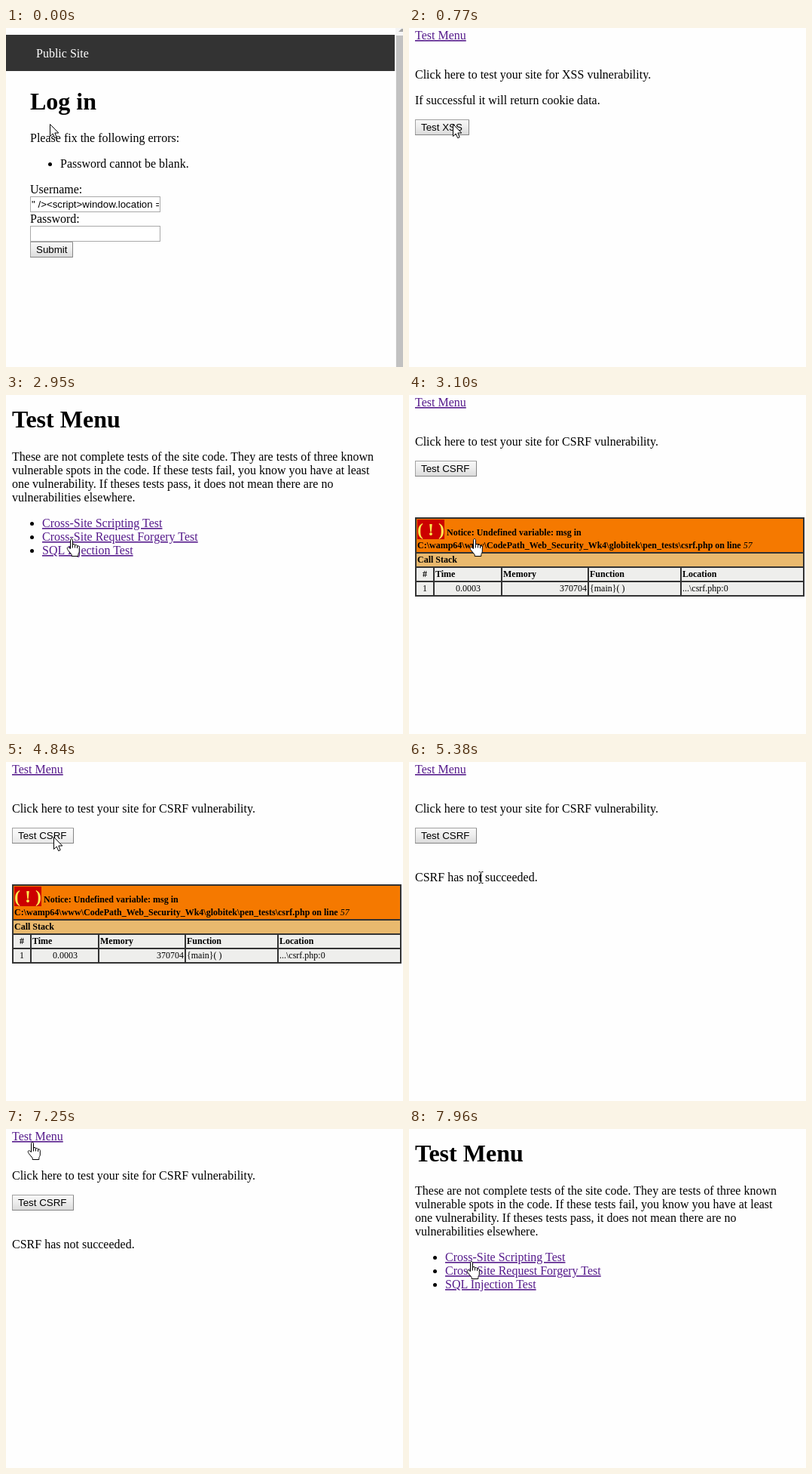
Write an HTML page that moves like this. It is 527 px wide and 449 px high and loops after 8000 ms.

```html
<!DOCTYPE html>
<html lang="en">
<head>
<meta charset="utf-8">
<title>Site security tests</title>
<style>
html, body { margin: 0; width: 100%; height: 100%; overflow: hidden; background: #fefefe; }
svg { display: block; }
text { font: 16px "Liberation Serif", "Times New Roman", serif; white-space: pre; }
.h1 { font-size: 32px; font-weight: bold; }
.ui { font: 13.333px "Liberation Sans", Arial, sans-serif; }
.link {
  fill: #551a8b;
  text-decoration: underline 1px;
  text-underline-offset: 2px;
  text-decoration-skip-ink: none;
}
.small text { font-size: 12px; }
.small .b { font-weight: bold; }
.small .line { font-style: italic; font-weight: normal; }
.small .bang { font-size: 24px; fill: #fce94f; }
.mid { text-anchor: middle; }
.end { text-anchor: end; }
.face { fill: url(#face); stroke: #a2a2a2; }
.edge { fill: none; stroke: #858585; }
.field { fill: #fff; stroke: #a9a9a9; }

/* Every change is a hard cut on one shared 8 s clock. */
.page, .shape, .state { opacity: 0; }
.page, .shape, .state, .link, #cursor, #selected rect { animation: 8s step-end infinite; }

#login { animation-name: login; }
#xss { animation-name: xss; }
#menu { animation-name: menu; }
#csrf { animation-name: csrf; }
#notice { animation-name: notice; }
#result { animation-name: result; }
@keyframes login { 0% { opacity: 1 } 9.625% { opacity: 0 } }
@keyframes xss { 9.625% { opacity: 1 } 26.75% { opacity: 0 } }
@keyframes menu { 26.75% { opacity: 1 } 38.75% { opacity: 0 } 97.75% { opacity: 1 } }
@keyframes csrf { 38.75% { opacity: 1 } 97.75% { opacity: 0 } }
@keyframes notice { 38.75% { opacity: 1 } 62.625% { opacity: 0 } }
@keyframes result { 62.625% { opacity: 1 } 97.75% { opacity: 0 } }

#xss .link { animation-name: press-xss; }
#to-csrf { animation-name: press-item; }
#csrf .link { animation-name: press-csrf; }
@keyframes press-xss { 23.75% { fill: #f00 } 25.25% { fill: #551a8b } }
@keyframes press-item { 35.25% { fill: #f00 } 36.875% { fill: #551a8b } }
@keyframes press-csrf { 94.25% { fill: #f00 } 96.125% { fill: #551a8b } }

#hover { fill: #fff; animation-name: hover; }
#down { fill: #d4d4d4; animation-name: down; }
@keyframes hover {
  49.25% { opacity: .35 } 62.625% { opacity: 0 }
  84.125% { opacity: .35 } 85.75% { opacity: 0 }
}
@keyframes down { 59% { opacity: .9 } 60.5% { opacity: 0 } }

#selected rect { animation-name: select; }
@keyframes select { 73.75% { width: 15px } 75.75% { width: 80px } 82.25% { width: 0 } }

#cursor { animation-name: move; }
@keyframes move {
  0% { transform: translate(58px, 127px) }
  13.125% { transform: translate(66px, 116px) }
  14.625% { transform: translate(68px, 107px) }
  16.25% { transform: translate(64px, 77px) }
  17.75% { transform: translate(56px, 56px) }
  19.25% { transform: translate(46px, 38px) }
  20.75% { transform: translate(40px, 22px) }
  22.25% { transform: translate(36px, 16px) }
  28.5% { transform: translate(60px, 62px) }
  30.125% { transform: translate(81px, 123px) }
  31.875% { transform: translate(81px, 150px) }
  33.375% { transform: translate(81px, 179px) }
  35.25% { transform: translate(80px, 190px) }
  44.375% { transform: translate(79px, 172px) }
  45.875% { transform: translate(76px, 140px) }
  47.375% { transform: translate(69px, 114px) }
  49.25% { transform: translate(64px, 100px) }
  51.125% { transform: translate(63px, 99px) }
  67.25% { transform: translate(92px, 145px) }
  69.125% { transform: translate(106px, 176px) }
  70.625% { transform: translate(116px, 168px) }
  72.25% { transform: translate(92px, 145px) }
  73.75% { transform: translate(107px, 148px) }
  75.75% { transform: translate(172px, 143px) }
  77.5% { transform: translate(173px, 150px) }
  80.625% { transform: translate(169px, 143px) }
  82.25% { transform: translate(160px, 143px) }
  84.125% { transform: translate(78px, 98px) }
  85.75% { transform: translate(44px, 48px) }
  87.25% { transform: translate(30px, 23px) }
  89% { transform: translate(28px, 18px) }
  90.625% { transform: translate(28px, 17px) }
  97.75% { transform: translate(56px, 52px) }
  99.5% { transform: translate(76px, 175px) }
}

#arrow { animation-name: arrow; }
#hand { animation-name: hand; }
#beam { animation-name: beam; }
@keyframes arrow {
  0% { opacity: 1 } 22.25% { opacity: 0 }
  28.5% { opacity: 1 } 30.125% { opacity: 0 }
  31.875% { opacity: 1 } 33.375% { opacity: 0 }
  45.875% { opacity: 1 } 67.25% { opacity: 0 }
  69.125% { opacity: 1 } 72.25% { opacity: 0 }
  77.5% { opacity: 1 } 80.625% { opacity: 0 }
  84.125% { opacity: 1 } 89% { opacity: 0 }
  97.75% { opacity: 1 } 99.5% { opacity: 0 }
}
@keyframes hand {
  22.25% { opacity: 1 } 28.5% { opacity: 0 }
  33.375% { opacity: 1 } 44.375% { opacity: 0 }
  89% { opacity: 1 } 97.75% { opacity: 0 }
  99.5% { opacity: 1 }
}
@keyframes beam {
  30.125% { opacity: 1 } 31.875% { opacity: 0 }
  44.375% { opacity: 1 } 45.875% { opacity: 0 }
  67.25% { opacity: 1 } 69.125% { opacity: 0 }
  72.25% { opacity: 1 } 77.5% { opacity: 0 }
  80.625% { opacity: 1 } 84.125% { opacity: 0 }
}
</style>
</head>
<body>
<svg width="527" height="449" viewBox="0 0 527 449">
  <defs>
    <linearGradient id="face" x2="0" y2="1">
      <stop offset="0" stop-color="#f8f8f8"/>
      <stop offset=".45" stop-color="#eee"/>
      <stop offset="1" stop-color="#dadada"/>
    </linearGradient>
    <clipPath id="selected"><rect x="92" y="144" width="0" height="17"/></clipPath>
    <clipPath id="inner"><rect x="34" y="225" width="169" height="17"/></clipPath>
  </defs>
  <rect width="527" height="449" fill="#fefefe"/>

  <g id="login" class="page">
    <path d="M0 9H516V57H0Z" fill="#333"/>
    <text x="40" y="39" fill="#fff">Public Site</text>
    <path d="M517 0h10v449h-10z" fill="#f5f5f5"/>
    <path d="M518 10h9v439h-9z" fill="#c1c1c1"/>
    <path d="M521 5h6v-4h-2z" fill="#a6a6a6"/>
    <text class="h1" x="32" y="108">Log in</text>
    <text x="32" y="151">Please fix the following errors:</text>
    <circle cx="58.5" cy="180.5" r="2.5"/>
    <text x="72" y="185">Password cannot be blank.</text>
    <text x="32" y="219">Username:</text>
    <rect class="field" x="32.5" y="223.5" width="172" height="20"/>
    <g clip-path="url(#inner)"><text class="ui" x="34" y="238">" /&gt;&lt;script&gt;window.location =</text></g>
    <text x="32" y="258">Password:</text>
    <rect class="field" x="32.5" y="262.5" width="172" height="20"/>
    <rect class="face" x="32.5" y="283.5" width="56" height="20"/>
    <path class="edge" d="M32 303.5H88.5V284"/>
    <text class="ui" x="40" y="298">Submit</text>
  </g>

  <g id="xss" class="page">
    <text class="link" x="8" y="15">Test Menu</text>
    <text x="8" y="67">Click here to test your site for XSS vulnerability.</text>
    <text x="8" y="101">If successful it will return cookie data.</text>
    <rect class="face" x="8.5" y="121.5" width="71" height="20"/>
    <path class="edge" d="M8 141.5H79.5V122"/>
    <text class="ui" x="16" y="136">Test XSS</text>
  </g>

  <g id="menu" class="page">
    <text class="h1" x="8" y="43">Test Menu</text>
    <text x="8" y="87">These are not complete tests of the site code. They are tests of three known</text>
    <text x="8" y="105">vulnerable spots in the code. If these tests fail, you know you have at least</text>
    <text x="8" y="123">one vulnerability. If theses tests pass, it does not mean there are no</text>
    <text x="8" y="141">vulnerabilities elsewhere.</text>
    <circle cx="34.5" cy="170.5" r="2.5"/>
    <circle cx="34.5" cy="188.5" r="2.5"/>
    <circle cx="34.5" cy="206.5" r="2.5"/>
    <text class="link" x="48" y="175">Cross-Site Scripting Test</text>
    <text class="link" id="to-csrf" x="48" y="193">Cross-Site Request Forgery Test</text>
    <text class="link" x="48" y="211">SQL Injection Test</text>
  </g>

  <g id="csrf" class="page">
    <text class="link" x="8" y="15">Test Menu</text>
    <text x="8" y="67">Click here to test your site for CSRF vulnerability.</text>
    <rect class="face" x="8.5" y="87.5" width="81" height="20"/>
    <rect class="state" id="hover" x="9" y="88" width="80" height="19"/>
    <rect class="state" id="down" x="9" y="88" width="80" height="19"/>
    <path class="edge" d="M8 107.5H89.5V88"/>
    <text class="ui" x="16" y="102">Test CSRF</text>
  </g>

  <g id="notice" class="page small">
    <path d="M8 162H525V209H8Z" fill="#f57900"/>
    <path d="M8 209H525V228H8Z" fill="#e9b96e"/>
    <path d="M8 228H525V267H8Z" fill="#eeeeec"/>
    <path d="M9 163H524V266H9ZM9 209H524M9 228H524M9 247H524M33 228V266M123 228V266M238 228V266M361 228V266" fill="none" stroke="#333" stroke-width="2"/>
    <path d="M11 165h36v26h-36z" fill="#c00"/>
    <text class="b bang" x="11" y="186">( ! )</text>
    <text class="b" x="50" y="186">Notice: Undefined variable: msg in</text>
    <text class="b" x="11" y="203">C:\wamp64\www\CodePath_Web_Security_Wk4\globitek\pen_tests\csrf.php on line <tspan class="line">57</tspan></text>
    <text class="b" x="11" y="222">Call Stack</text>
    <text class="b mid" x="21" y="241">#</text>
    <text class="b" x="35" y="241">Time</text>
    <text class="b" x="125" y="241">Memory</text>
    <text class="b" x="240" y="241">Function</text>
    <text class="b" x="363" y="241">Location</text>
    <text class="mid" x="21" y="260">1</text>
    <text class="mid" x="78.5" y="260">0.0003</text>
    <text class="end" x="236" y="260">370704</text>
    <text x="240" y="260">{main}( )</text>
    <text x="363" y="260">...\csrf.php:0</text>
  </g>

  <g id="result" class="page">
    <text x="8" y="158">CSRF has not succeeded.</text>
    <g clip-path="url(#selected)">
      <path d="M92 144h80v17h-80z" fill="#3390ff"/>
      <text x="8" y="158" fill="#fff">CSRF has not succeeded.</text>
    </g>
  </g>

  <g id="cursor" fill="#fff" stroke="#000">
    <path id="arrow" class="shape" d="M.5 .5V16.5L4.2 13L6.7 18.7L9.2 17.6L6.8 12H11.8Z"/>
    <g id="hand" class="shape">
      <path d="M5.5 13.5V2.2C5.5 0 8.5 0 8.5 2.2V8.8C8.5 7 11.5 7 11.5 8.8V9.6C11.5 8 14.5 8 14.5 10V10.8C14.5 9.4 17.3 9.4 17.3 11.6V17C17.3 19 15.8 20 15.8 21.5V23.5H7.2V21.5L2.5 15.8C.2 12.9 1.5 10.8 3.5 12Z"/>
      <path d="M8.5 8.5V12.5M11.5 9V12.5M14.5 10V13" fill="none"/>
    </g>
    <path id="beam" class="shape" fill="none" d="M.5 .5H2.5L3.5 1.5L4.5 .5H6.5M3.5 1V15M.5 15.5H2.5L3.5 14.5L4.5 15.5H6.5"/>
  </g>
</svg>
</body>
</html>
```
